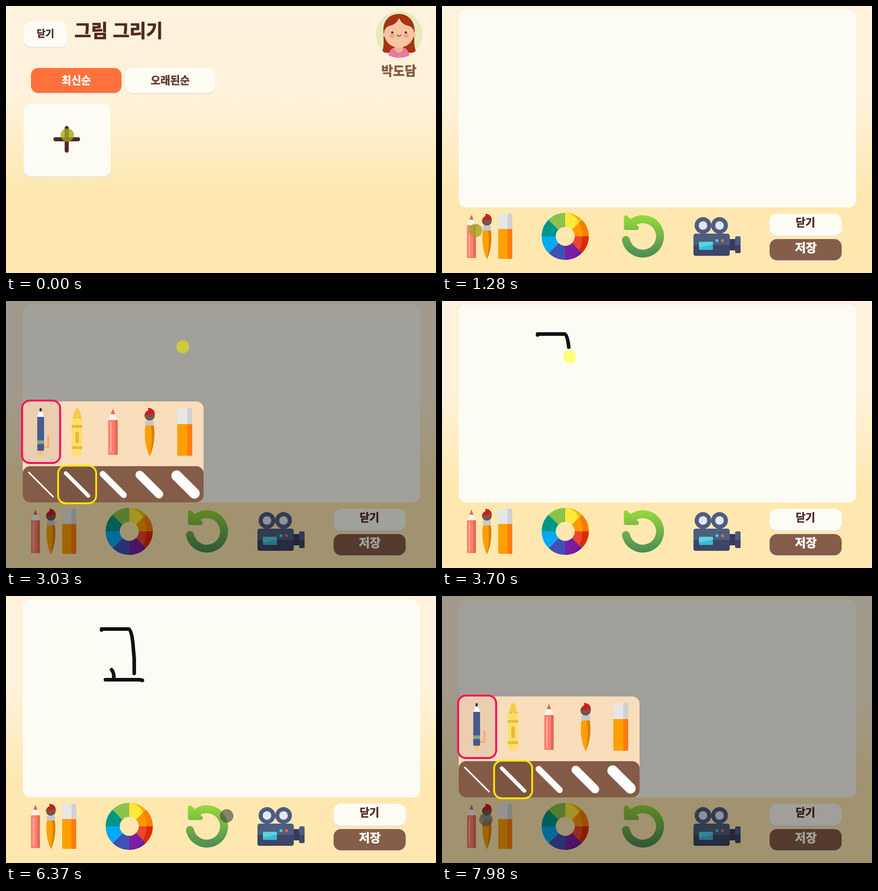
These frames come from a looping animation (949 px wide and 590 px high, 8 s). An HTML page:

```html
<!DOCTYPE html>
<html lang="ko">
<head>
<meta charset="utf-8">
<title>그림 그리기</title>
<style>
  html, body { margin: 0; width: 100%; height: 100%; overflow: hidden; }
  svg { display: block; width: 100vw; height: 100vh; }
  text {
    font-family: "Noto Sans CJK KR", "Noto Sans CJK", sans-serif; font-weight: 900; text-anchor: middle;
    fill: currentColor; stroke: currentColor; stroke-width: .03em; stroke-linejoin: round; color: #4e2a22;
  }
  .raised { filter: drop-shadow(0 3.5px .5px #ebe5da); }
  .paper { fill: #fdfcf4; }
  .light { color: #fffdf5; }
</style>
</head>
<body>
<svg viewBox="0 0 949 590">
  <defs>
    <linearGradient id="sky" x2="0" y2="1">
      <stop offset=".34" stop-color="#fef2dc"/>
      <stop offset=".7" stop-color="#fee8b0"/>
    </linearGradient>
    <linearGradient id="leaf" gradientUnits="userSpaceOnUse" x1="0" y1="462" x2="0" y2="556">
      <stop stop-color="#98da3a"/>
      <stop offset="1" stop-color="#4b8a57"/>
    </linearGradient>
    <clipPath id="badge"><circle cx="867.5" cy="63" r="51.5"/></clipPath>
    <clipPath id="wheelFace"><ellipse rx="38" ry="52"/></clipPath>
    <g id="route"></g>

    <g id="pencil">
      <path d="M0 0L10.5 25H-10.5Z" fill="#f6f3ee"/>
      <path d="M0 0L5 12H-5Z" fill="#e96556"/>
      <rect x="-10.5" y="25" width="21" height="77" rx="1" fill="#ff806e"/>
      <path d="M4 25H10.5V102H4Z" fill="#e56a59"/>
      <path d="M-6 30H-3V97H-6Z" fill="#ffb09c"/>
    </g>
    <g id="brush">
      <circle cy="17" r="11.3" fill="#795548"/>
      <path d="M-4 0Q12 1 11.500 16Q8 12 4 13Q0 18 -5 14Q-9 15 -11.300 18Q-10 9 -4 6Q-2 4 -4 0Z" fill="#c9201a"/>
      <path d="M0 39H9C13 60 9 90 0 107C-9 90 -13 60 -9 39Z" fill="#ff9f00"/>
      <path d="M3 39H9C13 60 9 90 0 107C5 85 6 60 3 39Z" fill="#db7f05"/>
      <rect x="-9.5" y="28" width="19" height="11" rx="2" fill="#c4c8ce"/>
    </g>
    <g id="eraser">
      <rect width="33" height="106" rx="3" fill="#ff9f00"/>
      <path d="M22 36H33V103Q33 106 30 106H22Z" fill="#ff7a10"/>
      <path d="M0 36V3Q0 0 3 0H30Q33 0 33 3V36Z" fill="#e6e6e6"/>
      <path d="M22 0H30Q33 0 33 3V36H22Z" fill="#d1d1d1"/>
    </g>
  </defs>

  <rect width="949" height="590" fill="url(#sky)"/>

  <g id="gallery">
    <g class="raised paper">
      <rect x="39" y="34" width="96" height="56" rx="16"/>
      <rect x="55" y="137" width="200" height="55" rx="16" fill="#ff703c"/>
      <rect x="263" y="137" width="199" height="55" rx="16"/>
      <rect x="39" y="216" width="192" height="160" rx="16"/>
    </g>
    <path d="M109 294.500H159M134 269.500V319.500" stroke="#4e2a22" stroke-width="9" stroke-linecap="round"/>
    <text x="87" y="68" font-size="21">닫기</text>
    <text x="248.5" y="69" font-size="40">그림 그리기</text>
    <text class="light" x="155" y="173" font-size="23.5">최신순</text>
    <text x="362.5" y="173" font-size="23.5" style="color:#65402f">오래된순</text>
    <text x="867" y="154" font-size="28" style="color:#80573f">박도담</text>

    <g clip-path="url(#badge)">
      <circle cx="867.5" cy="63" r="51.5" fill="#e5ebbd"/>
      <path d="M833 52C833 6 901 6 901 52C901 75 900 90 905 101Q889 107 867 98Q846 107 830 101C835 90 833 75 833 52Z" fill="#a63412"/>
      <path d="M843 116Q845 93 858 92H876Q889 93 891 116Z" fill="#ea7aa0"/>
      <path d="M858 86H876V97Q867 109 858 97Z" fill="#efb58d"/>
      <g fill="#f8c5a4">
        <circle cx="834" cy="64" r="4"/><circle cx="901" cy="64" r="4"/>
        <ellipse cx="867.5" cy="60" rx="33" ry="32"/>
      </g>
      <path d="M833 58C831 5 904 5 902 58Q897 45 886 43Q872 40 867.500 25Q863 40 849 43Q838 45 833 58Z" fill="#a63412"/>
      <g fill="#eba58d"><ellipse cx="852" cy="66" rx="6" ry="4.5"/><ellipse cx="883" cy="66" rx="6" ry="4.5"/></g>
      <g fill="#59281c"><circle cx="852.5" cy="58.5" r="2.5"/><circle cx="882.5" cy="58.5" r="2.5"/></g>
      <path d="M863 64Q867.500 69 872 64" fill="none" stroke="#59281c" stroke-width="1.7" stroke-linecap="round"/>
    </g>
  </g>

  <g id="studio">
    <rect class="paper" x="37" y="8" width="877" height="437" rx="16"/>
    <g id="drawing" fill="none" stroke="#111" stroke-width="8" stroke-linecap="round" stroke-linejoin="round"></g>

    <use href="#pencil" transform="translate(65 461) scale(.94)"/>
    <use href="#brush" transform="translate(99 459) scale(.94)"/>
    <use href="#eraser" transform="translate(124 459) scale(.94)"/>
    <g id="wheel" transform="translate(272 509)"></g>

    <g stroke="url(#leaf)" stroke-linejoin="round" stroke-linecap="round">
      <path d="M406 517A38 38 0 1 0 420 479" fill="none" stroke-width="17.5"/>
      <path d="M406 467L430 490.500H406Z" fill="url(#leaf)" stroke-width="9"/>
    </g>

    <g fill="#4d5d80">
      <circle cx="576" cy="485" r="18.5"/><circle cx="612.5" cy="485" r="18.5"/>
      <g fill="#e1e6ef"><circle cx="576" cy="485" r="9.5"/><circle cx="612.5" cy="485" r="9.5"/></g>
      <path d="M634 515H648V540H634Z" fill="#363b5d"/>
      <rect x="555" y="503" width="80" height="49" rx="5"/>
      <path d="M555 528H635V547Q635 552 630 552H560Q555 552 555 547Z" fill="#3e4566"/>
      <rect x="647" y="509" width="12" height="37" rx="3"/>
      <path d="M647 528H659V543Q659 546 656 546H650Q647 546 647 543Z" fill="#3e4566"/>
      <rect x="567" y="521" width="31" height="18" rx="2" fill="#36b9da"/>
      <path d="M569 521H596Q598 521 598 523V527L567 534V523Q567 521 569 521Z" fill="#58d2e0"/>
      <circle cx="607" cy="518.5" r="3.3" fill="#4fc7e0"/><circle cx="619" cy="518.5" r="3.3" fill="#f2663b"/>
    </g>

    <g class="raised">
      <rect class="paper" x="723" y="459" width="159" height="48" rx="16"/>
      <rect x="723" y="515" width="159" height="47" rx="16" fill="#855d48"/>
    </g>
    <text x="802" y="487" font-size="23.5">닫기</text>
    <text class="light" x="803" y="544" font-size="26">저장</text>
  </g>

  <g id="picker">
    <rect width="949" height="590" opacity=".37"/>
    <rect x="37" y="222" width="399" height="223" rx="16" fill="#faddbb"/>
    <rect x="37" y="365" width="399" height="80" rx="16" fill="#845b47"/>
    <rect x="35.5" y="220" width="84" height="138" rx="17" fill="#0001" stroke="#ff0059" stroke-width="4"/>

    <path d="M84 322.500H93.500V298" fill="none" stroke="#fbaa73" stroke-width="4.5"/>
    <path d="M71 330H82V340Q82 342 80 342H73Q71 342 71 340Z" fill="#fbc67a"/>
    <path d="M69 256H84V328Q84 331 81 331H72Q69 331 69 328Z" fill="#48598e"/>
    <path d="M69 308H84V316H69Z" fill="#82a680"/>
    <path d="M74 243H79L84 256H69Z" fill="#fff"/>
    <path d="M74 244V238Q76.500 235 79 238V244Z" fill="#2c355f"/>

    <path d="M153 239Q157 234 161 239L167 259H147Z" fill="#fbcb45"/>
    <rect x="145" y="257" width="23" height="84" rx="2" fill="#fee06b"/>
    <path d="M145 274H168V280H145ZM145 321H168V327H145ZM148 257H155V259H148ZM160 257H167V259H160Z" fill="#e7b93f"/>
    <rect x="153" y="288" width="8" height="26" rx="4" fill="#e7b93f"/>

    <use href="#pencil" x="236" y="238"/>
    <use href="#brush" x="317" y="236"/>
    <use href="#eraser" x="378" y="236"/>
    <rect id="sizeFrame" y="364" width="84" height="83" rx="17" fill="#0001" stroke="#ffe500" stroke-width="4"/>
    <g id="sizes" stroke="#fff" stroke-linecap="round"></g>
  </g>

  <circle id="pointer" r="14.5"/>
</svg>

<script>
const LOOP = 8000;
const $ = id => document.getElementById(id);
const clamp = v => Math.max(0, Math.min(1, v));
const show = (node, visible) => node.style.display = visible ? '' : 'none';

function add(parent, tag, attributes) {
  const node = document.createElementNS('http://www.w3.org/2000/svg', tag);
  for (const name in attributes) node.setAttribute(name, attributes[name]);
  return parent.appendChild(node);
}

// Colour wheel: eight wedges, the right half with a darker rim
const wedge = i => {
  const point = a => `${52 * Math.sin(a)} ${-52 * Math.cos(a)}`;
  const a = i * Math.PI / 4;
  return `M0 0L${point(a)}A52 52 0 0 1 ${point(a + Math.PI / 4)}Z`;
};
const hues = ['#ffe93b', '#ff9800', '#f04432', '#7b1fa2', '#3f51b5', '#03a9f4', '#009688', '#8bc34a'];
const rims = ['#ffb300', '#f57f00', '#db2b00', '#6a1b9a'];
rims.forEach((fill, i) => add($('wheel'), 'path', { d: wedge(i), fill }));
hues.forEach((fill, i) => add($('wheel'), 'path',
  { d: wedge(i), fill, ...(rims[i] && { 'clip-path': 'url(#wheelFace)' }) }));
add($('wheel'), 'circle', { r: 21, fill: '#fee8b0' });

for (let i = 0; i < 5; i++) {
  const width = 3.5 + 5 * i, half = 28 - .36 * width, x = 77 + i * 79.8, y = 405.5;
  add($('sizes'), 'line', { x1: x - half, y1: y - half, x2: x + half, y2: y + half, 'stroke-width': width });
}

// The pointer follows these paths and glides straight from one to the next
const move = (start, end, d, parent = $('route')) => {
  const path = add(parent, 'path', { d });
  return { start, end, path, length: path.getTotalLength() };
};
const stroke = (start, end, d) => move(start, end, d, $('drawing'));
const strokes = [
  stroke(3430, 3815, 'M211 75V73H271Q277 76 280 104L283 140V171'),
  stroke(4090, 4230, 'M233 163Q238 168 238 180'),
  stroke(4430, 4700, 'M219.500 185H295L301 186.500'),
];
const moves = [
  move(0, 940, 'M135 285C160 310 300 330 267 345S150 390 74 496'),
  move(1480, 1750, 'M74 496L92 348'),
  move(1750, 2550, 'M92 348Q132 422 152 398'),
  move(2620, 2890, 'M152 398L391 101'),
  move(3030, 3290, 'M391 101Q290 120 211 75'),
  ...strokes,
  move(4700, 5100, 'M301 186Q285 260 135 476'),
  move(5300, 5440, 'M135 476L734 460'),
  move(5640, 6370, 'M734 460L230 520L487 486'),
  move(6500, 6570, 'M487 486L475 484'),
  move(6780, 7560, 'M475 484C300 500 30 620 71 520L97 494'),
];
const taps = [-70, 1350, 2430, 3010, 6640, 7600];

const along = ({ path, length }, k) => path.getPointAtLength(length * clamp(k));

function pointerAt(t) {
  const i = moves.findLastIndex(m => m.start <= t);
  const current = moves[i], next = moves[i + 1];
  const here = along(current, (t - current.start) / (current.end - current.start));
  if (t <= current.end || !next) return here;
  const there = along(next, 0);
  const k = (t - current.end) / (next.start - current.end);
  return { x: here.x + (there.x - here.x) * k, y: here.y + (there.y - here.y) * k };
}

function pressAt(t) {
  const level = (start, end) => clamp(1 - Math.max(start - t, t - end) / 150);
  return Math.max(...taps.map(tap => level(tap, tap)), ...strokes.map(s => level(s.start, s.end)));
}

function drawPointer(t) {
  const { x, y } = pointerAt(t), press = pressAt(t);
  const mix = (from, to) => from + (to - from) * press;
  const alpha = mix(.6, .5) + .25 * Math.sin(Math.PI * press);
  const pointer = $('pointer');
  pointer.setAttribute('cx', x);
  pointer.setAttribute('cy', y);
  pointer.setAttribute('fill', `rgba(${mix(64, 255)},${mix(64, 255)},${mix(64, 0)},${alpha})`);
  pointer.setAttribute('stroke', `rgba(70,70,60,${mix(.4, 0)})`);
}

function render(t) {
  const inStudio = t >= 210;
  show($('gallery'), !inStudio);
  show($('studio'), inStudio);

  const opened = t < LOOP / 2 ? clamp((t - 1410) / 180) * clamp((3160 - t) / 130) : clamp((t - 7640) / 220);
  show($('picker'), opened);
  $('picker').style.opacity = opened;
  $('sizeFrame').setAttribute('x', t < 2430 ? 35.5 : 115);

  // Ink trails slightly behind the pointer until undo wipes it
  const inkTime = t - 50;
  for (const { start, end, path, length } of strokes) {
    const drawn = clamp((inkTime - start) / (end - start));
    show(path, drawn > 0 && t < 6780);
    path.setAttribute('stroke-dasharray', `${drawn * length} ${2 * length}`);
  }
  drawPointer(t);
}

function tick() {
  render(performance.now() % LOOP);
  requestAnimationFrame(tick);
}
tick();
</script>
</body>
</html>
```
